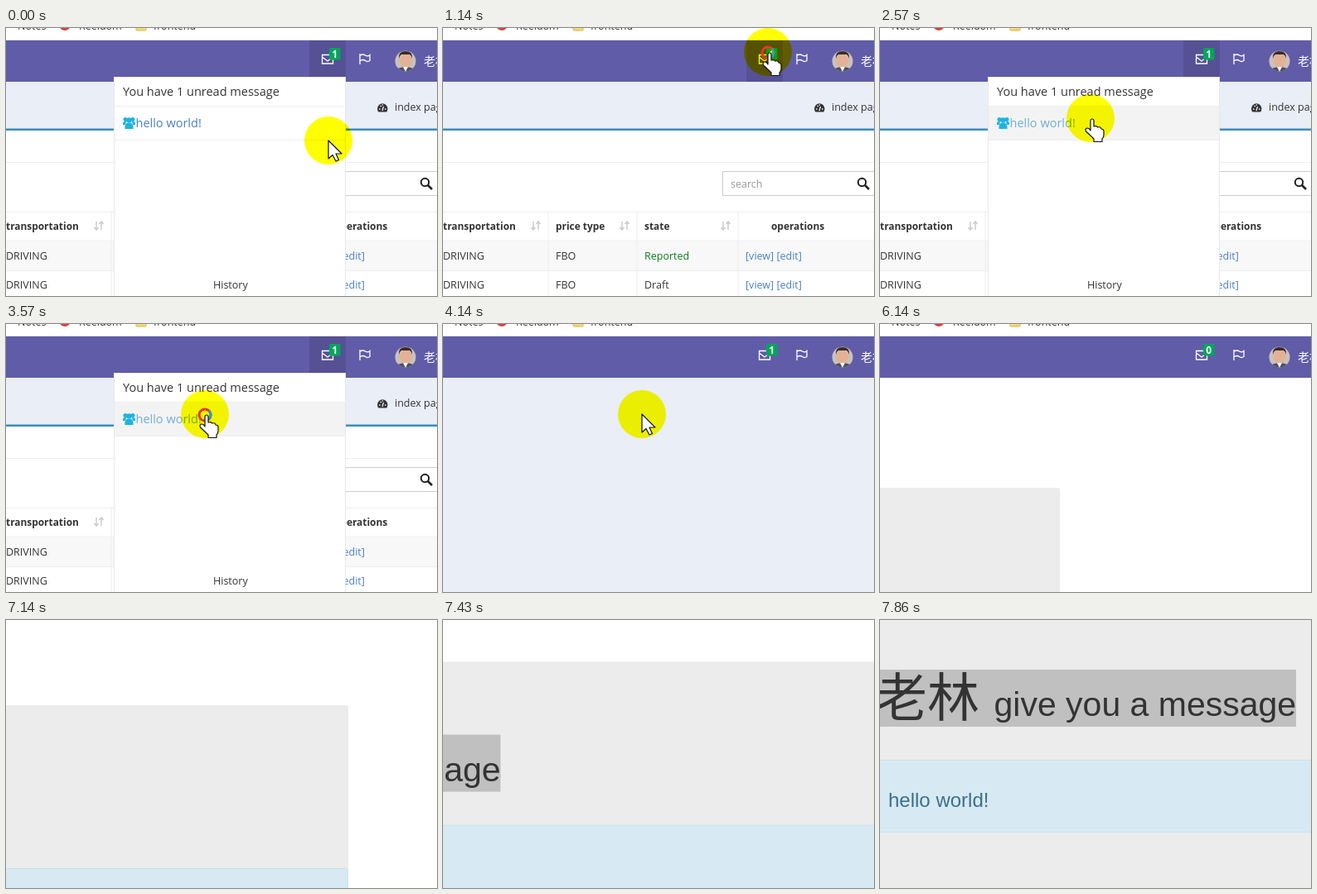
These frames come from a looping animation (520 px wide and 324 px high, 8 s). An HTML page:

```html
<!DOCTYPE html>
<html lang="en">
<head>
<meta charset="utf-8">
<title>Unread message</title>
<style>
  html, body { margin: 0; width: 100%; height: 100%; overflow: hidden; background: #fff; }
  svg { display: block; width: 520px; height: 324px; font: 12.5px "Open Sans", "Noto Sans CJK SC", "Noto Sans CJK", sans-serif; fill: #333; }
  .bold { font-weight: 700; font-size: 11.9px; }
  .big { font-size: 14.5px; }
  .link { fill: #4a80bd; }
  .link.hover { fill: #72afd2; }
  .line { stroke: #eee; fill: none; }
  .white { stroke: #fff; stroke-width: 1.3; fill: none; }
  .message { font-family: "Liberation Sans", "Noto Sans CJK SC", "Noto Sans CJK", sans-serif; }
  #spot { fill: #ff0; mix-blend-mode: multiply; }
  .pointer { fill: #fff; stroke: #111; stroke-width: 1.2; stroke-linejoin: round; }
</style>
</head>
<body>
<svg viewBox="0 0 520 324">
  <defs>
    <path id="sort" d="M-3-5V4M-5.500 2L-3 5-.5 2M3 5V-4M.5-2L3-5 5.500-2" fill="none" stroke="#ccc" stroke-width="1.500"/>
    <clipPath id="round"><circle cx="482" cy="40" r="12.500"/></clipPath>
  </defs>
  <rect width="520" height="324" fill="#fff"/>

  <g id="camera">
    <g id="listPage">
      <rect y="65" width="520" height="57" fill="#eaeef6"/>
      <rect y="121.500" width="520" height="2.500" fill="#3c8dbc"/>
      <path d="M449.500 101.500a6.200 6.200 0 1 1 9.500 0z"/>
      <path d="M454 100l1.500-5M450 98h1.500M457 98h1.500M451.500 94.500h1.500M453.700 93h1.300" stroke="#eaeef6" stroke-width="1.300"/>
      <text x="469" y="100">index page</text>
      <path class="line" d="M0 162.500H520"/>
      <rect x="337.500" y="173.500" width="200" height="29" fill="#fff" stroke="#ccc"/>
      <text x="347" y="193" fill="#999">search</text>
      <g fill="none" stroke="#222" stroke-width="2"><circle cx="505.500" cy="186.500" r="4.700"/><path d="M509 190l5 5" stroke-width="2.600"/></g>

      <rect y="258" width="520" height="35" fill="#f8f8f8"/>
      <path class="line" d="M0 222.500H520M0 257H520M0 293.500H520M127 222V324M234 222V324M356 222V324"/>
      <g class="bold">
        <text x="0" y="244">transportation</text>
        <text x="136" y="244">price type</text>
        <text x="243" y="244">state</text>
        <text x="396" y="244">operations</text>
      </g>
      <use href="#sort" x="112" y="239"/><use href="#sort" x="219" y="239"/><use href="#sort" x="341" y="239"/>
      <text x="0" y="280">DRIVING</text><text x="136" y="280">FBO</text>
      <text x="243" y="280" fill="#0a7d1c">Reported</text><text class="link" x="365" y="280">[view] [edit]</text>
      <text x="0" y="315">DRIVING</text><text x="136" y="315">FBO</text>
      <text x="243" y="315">Draft</text><text class="link" x="365" y="315">[view] [edit]</text>
    </g>

    <rect id="blankPage" y="65" width="520" height="259" fill="#eaeef6"/>

    <g id="messagePage" class="message">
      <rect x="-923" y="198" width="1140" height="360" rx="3" fill="#ececec"/>
      <rect x="-923" y="286" width="508" height="69" fill="#c0c0c0"/>
      <text x="-923" y="342" font-size="63">老林</text>
      <text x="-779.500" y="342" font-size="41">give you a message</text>
      <rect x="-922.500" y="395.500" width="1139" height="87" rx="3" fill="#d7e9f3" stroke="#c9e3ea"/>
      <text x="-907" y="452" font-size="24" fill="#3b708c">hello world!</text>
    </g>

    <g id="header">
      <rect x="-1400" width="2300" height="15" fill="#fff"/>
      <text x="14" y="1.500">Notes</text>
      <circle cx="71" cy="-4" r="7" fill="#d9423c"/>
      <text x="88" y="1.500">Reeldom</text>
      <rect x="157" y="-9" width="12" height="12" rx="1" fill="#f6d978" stroke="#d9b44d"/>
      <text x="178" y="1.500">frontend</text>
      <rect x="-1400" y="14" width="2300" height="1" fill="#e4e4ec"/>
      <rect x="-1400" y="15" width="2300" height="50" fill="#605ca8"/>
      <rect id="active" x="366" y="15" width="44" height="50" fill="#555194"/>
      <path class="white" d="M381.500 32.500h13v10.500h-13zM381.500 35l6.500 5 6.500-5"/>
      <rect x="390" y="24" width="13.500" height="14.500" rx="2" fill="#00a65a"/>
      <text id="count" class="bold" x="396.700" y="35.500" text-anchor="middle" style="fill:#fff">1</text>
      <path class="white" d="M427 31V44M427.500 33q3-2 6 0t5.500-.5v7q-3 2-5.500 0t-6 0"/>
      <g clip-path="url(#round)">
        <rect x="469" y="27" width="26" height="26" fill="#c9c2bd"/>
        <ellipse cx="482" cy="39" rx="7.500" ry="9" fill="#e3b296"/>
        <path d="M474 37q-1-9 8-9t8 9q-1-4-3-5h-10q-2 1-3 5z" fill="#3b2d2b"/>
        <path d="M470 54q1-7 12-7t12 7z" fill="#4c5061"/>
        <path d="M479 47h6l-3 6z" fill="#f4f4f4"/>
      </g>
      <text x="504" y="45" font-size="14" style="fill:#fff">老林</text>
    </g>

    <g id="menu">
      <rect x="130.500" y="59.500" width="279" height="290" fill="#fff" stroke="#e8e8e8"/>
      <text class="big" x="141" y="82">You have 1 unread message</text>
      <rect id="row" x="131" y="95" width="278" height="40" fill="#f3f3f3"/>
      <path class="line" d="M131 94.500H409M131 135.500H409"/>
      <g fill="#1fb4e0">
        <circle cx="144" cy="110.500" r="2.500"/><circle cx="153" cy="110.500" r="2.500"/><circle cx="148.500" cy="111.500" r="3.300"/>
        <path d="M141 117v-2q1-3 4-2l-1 4zM156 117v-2q-1-3-4-2l1 4zM143.500 122v-3q1-5 5-4 4-1 5 4v3z"/>
      </g>
      <text id="link" class="link big" x="156.500" y="120">hello world!</text>
      <text x="250" y="315">History</text>
    </g>
  </g>

  <g id="cursor">
    <circle id="spot" r="29"/>
    <g id="ring" fill="none" stroke-width="3"><circle cy="1" r="7" stroke="#e33a30"/><path d="M5-4a7 7 0 0 1 0 10" stroke="#2a9fc4"/></g>
    <path id="arrow" class="pointer" d="M0 0V22L5 17.500 9 25 12.500 23.500 9 16H16Z"/>
    <path id="hand" class="pointer" d="M0 3a2 2 0 0 1 4 0v7q4-1 4.500 1 4-1 4.500 2 3 0 3 3v4q0 3-2 5v3.500h-10v-3.500q-5-5-9.500-9-1.500-4 2-4 2 0 3.500 3z"/>
  </g>
</svg>
<script>
  const TICKS = 56, LOOP = 8000;   // the screen refreshes seven times a second
  const $ = id => document.getElementById(id);
  const show = (id, on) => { $(id).style.display = on ? '' : 'none'; };
  const within = (v, from, to) => v >= from && v < to;

  // Keys are [tick, x, y]
  const cursorPath = [
    [0, 389, 136], [4, 392, 85], [7, 392, 29], [9, 392, 29], [15, 275, 96], [17, 275, 96],
    [18, 254, 109], [20, 222, 110], [21, 240, 109], [31, 240, 109], [34, 205, 75],
    [36, 120, 150], [38, 78, 240], [39, 90, 282], [40, 112, 200], [41, 80, 123], [43, -40, 200]
  ];
  const cameraPath = [[47, 0, 0], [50, 196, -95], [55, 917, -226]];

  function follow(path, tick) {
    const next = path.findIndex(key => key[0] > tick);
    if (next === 0) return path[0].slice(1);
    if (next < 0) return path[path.length - 1].slice(1);
    const a = path[next - 1], b = path[next];
    const p = (tick - a[0]) / (b[0] - a[0]);
    return [1, 2].map(i => a[i] + (b[i] - a[i]) * p);
  }

  const place = (id, [x, y]) => $(id).setAttribute('transform', `translate(${x} ${y})`);

  function draw(tick) {
    const position = follow(cursorPath, tick), [x, y] = position;
    const listed = tick < 27;
    const open = listed && !within(tick, 7, 10);
    const onIcon = within(x, 366, 410) && within(y, 15, 65);
    const onRow = open && within(x, 130, 410) && within(y, 95, 136);

    show('listPage', listed);
    show('blankPage', within(tick, 27, 30));
    show('messagePage', tick >= 30);
    show('menu', open);
    show('row', onRow);
    $('link').classList.toggle('hover', onRow);
    show('active', open || onIcon);
    $('count').textContent = tick < 32 ? 1 : 0;

    show('cursor', tick < 43);
    show('hand', onIcon || onRow);
    show('arrow', !onIcon && !onRow);
    show('ring', tick === 8 || within(tick, 24, 26));
    place('cursor', position);
    place('camera', follow(cameraPath, tick));
  }

  const start = performance.now();
  function frame() {
    const time = (performance.now() - start) % LOOP;
    draw(Math.floor((time + 5) * TICKS / LOOP) % TICKS);
    requestAnimationFrame(frame);
  }
  frame();
</script>
</body>
</html>
```
